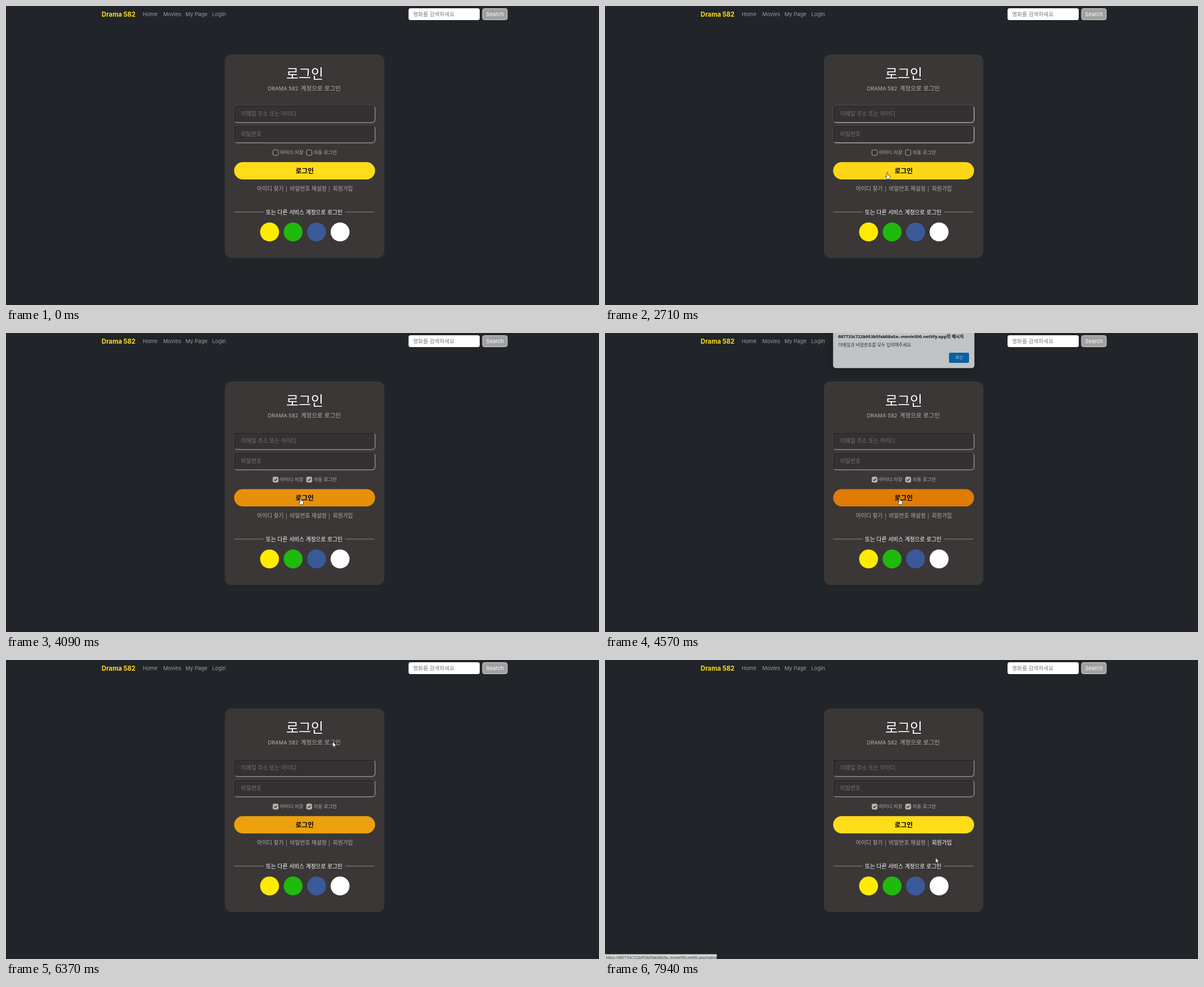
An HTML page for the animation above (8000 ms loop, 1054x531 px).

```html
<!DOCTYPE html>
<html lang="ko">
<head>
<meta charset="utf-8">
<style>
html, body { margin: 0; height: 100%; overflow: hidden; background: #212529; }
svg { display: block; width: 100vw; height: 100vh; font: 9.75px Inter, "Noto Sans CJK KR", "Noto Sans CJK", sans-serif; fill: #b6b0ae; }
.nav { font-size: 9.4px; fill: #9a9c9e; }
.ko { font-family: "Noto Sans CJK KR", "Noto Sans CJK", sans-serif; }
.ui { font-family: "Open Sans", "Noto Sans CJK KR", "Noto Sans CJK", sans-serif; }
.mid { text-anchor: middle; }
.hint { fill: #777573; }
.line { fill: none; stroke-width: 1.5; }
</style>
</head>
<body>
<svg viewBox="0 0 1054 531">
  <defs>
    <g id="field">
      <rect x="405.5" y="176.5" width="251" height="31" rx="6" fill="#333131"/>
      <path class="line" stroke="#1d1c1c" d="M407.5 205.5Q406.2 204 406.2 202V183q0-5.8 5.8-5.8H650q3 0 4.5 1.5"/>
      <path class="line" d="M407.5 205.5q1.5 1.3 4.5 1.3H650q5.8 0 5.8-5.8V183q0-3-1.3-4.3"/>
    </g>
    <filter id="shadow" x="-15%" y="-30%" width="130%" height="180%">
      <feDropShadow dx="0" dy="4" stdDeviation="7" flood-opacity=".4"/>
    </filter>
  </defs>
  <rect width="1054" height="531" fill="#212529"/>

  <text x="170" y="18.5" font-size="11.3" font-weight="700" fill="#fedd1b">Drama 582</text>
  <g class="nav">
    <text x="243" y="17.5">Home</text>
    <text x="279.5" y="17.5">Movies</text>
    <text x="319" y="17.5">My Page</text>
    <text x="366.5" y="17.5">Login</text>
  </g>
  <rect x="715.5" y="4" width="126.5" height="21" rx="3.5" fill="#fff"/>
  <text class="ko" x="723.5" y="17.7" font-size="9.65" fill="#75777a">영화를 검색하세요</text>
  <rect x="847" y="4.5" width="44" height="20" rx="3.5" fill="#a1a1a2" stroke="#d2d2d2"/>
  <text class="mid" x="869" y="17.5" font-size="9.3" fill="#fff">Search</text>

  <rect x="389" y="86" width="283.5" height="361.5" rx="12" fill="#3b3737"/>
  <g class="ko">
    <text class="mid" x="531" y="128.5" font-size="24" fill="#fff">로그인</text>
    <text y="149.5" font-size="10.6"><tspan x="465.5" font-family="Inter, sans-serif" font-size="9.4">DRAMA 582</tspan><tspan x="523.7">계정으로 로그인</tspan></text>
    <use id="email" href="#field"/>
    <use id="password" href="#field" y="36"/>
    <text class="hint" x="418" y="194.8">이메일 주소 또는 아이디</text>
    <text class="hint" x="418" y="231">비밀번호</text>
    <g id="options" font-size="8.5"></g>
    <rect id="login" x="405.5" y="277.3" width="250.5" height="30.6" rx="15.3"/>
    <text class="mid" x="531" y="296.5" font-size="11.7" font-weight="600" fill="#000">로그인</text>
    <text id="findId" x="446" y="328.4">아이디 찾기</text>
    <text x="497" y="328">|</text>
    <text id="reset" x="504.5" y="328.4">비밀번호 재설정</text>
    <text x="573" y="328">|</text>
    <text id="join" x="580.7" y="328.4">회원가입</text>
    <path d="M405.5 366H458M602.5 366H654.5" stroke="#8d8a89"/>
    <text class="mid" x="530" y="369.6" font-size="9.72" font-weight="500" fill="#fff">또는 다른 서비스 계정으로 로그인</text>
  </g>
  <circle cx="468.5" cy="401.3" r="16.8" fill="#ffeb00"/>
  <circle cx="510.3" cy="401.3" r="16.8" fill="#20b90d"/>
  <circle cx="552" cy="401.3" r="16.8" fill="#3b5998"/>
  <circle cx="593.8" cy="401.3" r="16.8" fill="#fff"/>

  <g id="dialog" class="ui" filter="url(#shadow)">
    <rect x="406" y="-30" width="250" height="97.3" rx="5" fill="#fff"/>
    <text x="415" y="13.7" font-size="7.75" font-weight="700" fill="#111">687733c722b953b5fab08a5a--movie500.netlify.app의 메시지</text>
    <text x="415" y="29.4" font-size="7.85" fill="#333">이메일과 비밀번호를 모두 입력해주세요.</text>
    <rect id="ok" x="611" y="40" width="35.5" height="18" rx="2"/>
    <text class="mid" x="628.8" y="51.4" font-size="7.4" fill="#fff">확인</text>
  </g>

  <g id="status" class="ui">
    <path d="M0 522.5H197q2 0 2 2V531H0Z" fill="#d3d4d5"/>
    <text x="1.5" y="530.6" font-size="6.5" fill="#333">https://687733c722b953b5fab08a5a--movie500.netlify.app/login#</text>
  </g>
  <path id="cursor" fill="#fff" stroke="#111" stroke-width=".7" stroke-linejoin="round"/>
</svg>
<script>
const $ = id => document.getElementById(id);
const LOOP = 8000;
const ARROW = 'M0 0V9.5L2.2 7.5 3.6 10.6 5 10 3.7 6.9H6.6Z';
const HAND = 'M-1 1.2q0-1.2 1-1.2t1 1.2v3.3l3.3.8q1.1.3 1 1.5l-.5 3-.8 2h-4.6l-2.7-4q.2-1.4 1.6-.5l.7.6z';

// Pointer track: time, x, y
const track = [
  [70, 374, 13], [300, 1022, 518], [610, 486, 178], [810, 486, 178], [880, 486, 191],
  [1140, 486, 191], [1410, 962, 347], [1610, 862, 377], [1750, 511.5, 232], [1950, 500, 188],
  [2370, 480, 195], [2450, 480, 195], [2700, 500, 290], [2830, 520, 355], [3050, 505, 260],
  [3200, 505, 260], [3400, 540, 228], [3610, 574, 259.5], [3760, 570, 260], [3980, 523.5, 293],
  [4850, 523.5, 293], [5000, 495, 328], [5550, 620, 55.5], [5620, 620, 52], [6100, 620, 52],
  [6500, 562, 189.5], [6770, 560, 341], [6900, 560, 341], [7150, 470, 324], [7350, 480, 324],
  [7660, 545, 324], [7730, 545, 324], [7870, 592, 326], [7940, 587.5, 351]
];

const clamp = u => Math.min(1, Math.max(0, u));
const ease = u => (u = clamp(u), u * u * (3 - 2 * u));
const pulse = (t, on, off, len = 300) => ease((t - on) / len) - ease((t - off) / len);
const within = (t, a, b) => t >= a && t < b;
const mix = (a, b, u) => `rgb(${a.map((v, i) => v + (b[i] - v) * u)})`;
const glow = (t, on, off) => mix([182, 176, 174], [255, 255, 255], pulse(t, on, off, 120));

$('options').innerHTML = [[474, '아이디 저장'], [533.7, '자동 로그인']].map(([x, label], i) => `
  <g id="option${i}">
    <rect x="${x + .5}" y="255.7" width="9.4" height="9.4" rx="2"/>
    <path d="M${x + 2.8} 260.5l1.7 1.8 3.4-3.8" fill="none" stroke="#302d2d" stroke-width="1.4"/>
    <text x="${x + 13}" y="262.8">${label}</text>
  </g>`).join('');

function option(i, checked, color) {
  const [box, tick, label] = $('option' + i).children;
  box.setAttribute('fill', checked ? '#b9b1af' : '#353131');
  box.setAttribute('stroke', color);
  tick.style.display = checked ? '' : 'none';
  label.setAttribute('fill', color);
}

function pointer(t) {
  const i = track.findIndex(k => k[0] > t);
  const b = track.at(i), a = track[i < 0 ? track.length - 1 : Math.max(0, i - 1)];
  const u = b === a ? 0 : clamp((t - a[0]) / (b[0] - a[0]));
  return [a[1] + (b[1] - a[1]) * u, a[2] + (b[2] - a[2]) * u];
}

function drawCursor(t) {
  const [x, y] = pointer(t);
  const hit = (l, top, r, bottom) => x > l && x < r && y > top && y < bottom;
  const clickable = hit(405, 176, 657, 207) || hit(405, 212, 657, 243) || hit(474, 254, 588, 266)
    || hit(405, 277, 657, 308) || hit(446, 319, 617, 332);
  const cursor = $('cursor');
  cursor.setAttribute('d', clickable && !within(t, 4850, 6700) ? HAND : ARROW);
  cursor.setAttribute('transform', `translate(${x} ${y})`);
  cursor.style.display = t < 70 || within(t, 1410, 1610) ? 'none' : '';
}

function draw(t) {
  const border = u => mix([122, 119, 118], [165, 161, 159], u);
  $('email').setAttribute('stroke', border(pulse(t, 1900, 2560)));
  $('password').setAttribute('stroke', border(pulse(t, 1760, 1850) + pulse(t, 2530, 2640) + pulse(t, 3320, 3450, 150)));

  option(0, t >= 3200, glow(t, 3030, 3300));
  option(1, t >= 3700, glow(t, 3490, 3830));

  const hover = pulse(t, 2670, 2740) + pulse(t, 3880, 6245);
  $('login').setAttribute('fill', mix([255, 220, 24], [224, 123, 5], hover));

  $('findId').setAttribute('fill', glow(t, 7060, 7400));
  $('reset').setAttribute('fill', glow(t, 7460, 7740));
  $('join').setAttribute('fill', glow(t, 7790, 9000));
  $('status').style.display = t >= 7080 ? '' : 'none';

  const shown = pulse(t, 4440, 6040, 200), dialog = $('dialog');
  const scale = 1 + .016 * (1 - shown);
  dialog.style.display = shown > 0 ? '' : 'none';
  dialog.setAttribute('opacity', shown);
  dialog.setAttribute('transform', `translate(${531 * (1 - scale)} ${-18 * (1 - shown)}) scale(${scale} 1)`);
  $('ok').setAttribute('fill', within(t, 5690, 5760) ? '#2b8fdd' : '#0078d4');

  drawCursor(t);
}

const start = performance.now();
function tick() {
  draw((performance.now() - start) % LOOP);
  requestAnimationFrame(tick);
}
tick();
</script>
</body>
</html>
```
